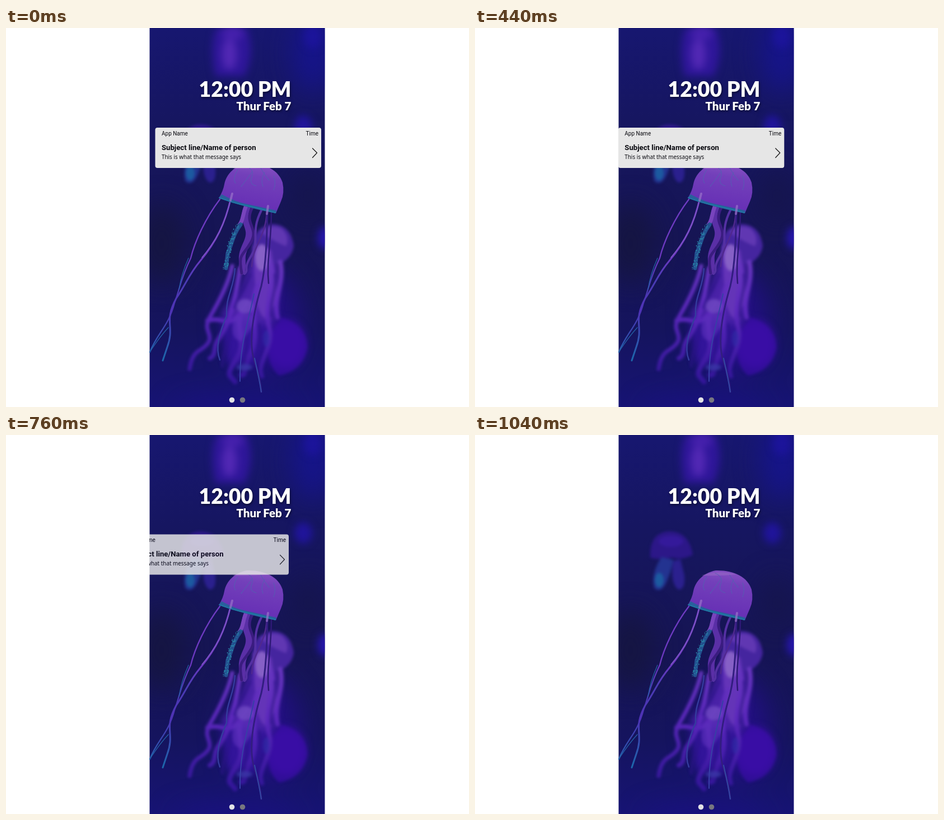
An HTML page for the animation above (2.84 s loop, 827 by 677 pixels).

```html
<!DOCTYPE html>
<html lang="en">
<head>
<meta charset="utf-8">
<title>Swipe to dismiss</title>
<style>
  html, body { margin: 0; width: 100%; height: 100%; overflow: hidden; background: #fff; }
  svg { display: block; }
  path { stroke-linecap: round; stroke-linejoin: round; }
  filter { color-interpolation-filters: sRGB; }
  .strands path { fill: none; }
  .clock { font-family: Lato, sans-serif; font-weight: 900; fill: #fff; text-anchor: end; filter: drop-shadow(1px 2px 2px #0008); }
  .small { font: 10px Roboto, sans-serif; }
  .subject { font: 700 13.15px Roboto, sans-serif; }
  .message { font: 9.87px "Noto Sans", sans-serif; }
</style>
</head>
<body>
<svg width="827" height="677" viewBox="0 0 827 677">
  <defs>
    <clipPath id="screen"><rect x="256.5" width="313" height="677"/></clipPath>
    <linearGradient id="water" x2="0" y2="1">
      <stop offset="0" stop-color="#171770"/>
      <stop offset=".25" stop-color="#161660"/>
      <stop offset=".55" stop-color="#161554"/>
      <stop offset=".8" stop-color="#15145e"/>
      <stop offset="1" stop-color="#171474"/>
    </linearGradient>
    <linearGradient id="bell" x1=".6" y1="0" x2=".4" y2="1">
      <stop offset="0" stop-color="#8550c2"/>
      <stop offset=".25" stop-color="#7340ba"/>
      <stop offset="1" stop-color="#642cb4"/>
    </linearGradient>
    <linearGradient id="tip" gradientUnits="userSpaceOnUse" x1="0" y1="310" x2="0" y2="590">
      <stop offset="0" stop-color="#6f3cc2"/>
      <stop offset=".35" stop-color="#6c38c0"/>
      <stop offset=".5" stop-color="#4a3cb4"/>
      <stop offset=".7" stop-color="#4e32b4"/>
      <stop offset="1" stop-color="#1d66aa"/>
    </linearGradient>
    <linearGradient id="veil" gradientUnits="userSpaceOnUse" x1="0" y1="380" x2="0" y2="630">
      <stop offset="0" stop-color="#6c3cc0"/>
      <stop offset=".5" stop-color="#5c28bc"/>
      <stop offset="1" stop-color="#34169a"/>
    </linearGradient>
    <filter id="soft" x="-60%" y="-60%" width="220%" height="220%"><feGaussianBlur stdDeviation="2.8"/></filter>
    <filter id="mist" x="-80%" y="-80%" width="260%" height="260%"><feGaussianBlur stdDeviation="7"/></filter>
    <filter id="haze" x="-80%" y="-80%" width="260%" height="260%"><feGaussianBlur stdDeviation="24"/></filter>
  </defs>

  <g clip-path="url(#screen)">
    <rect x="256" width="314" height="677" fill="url(#water)"/>

    <!-- depth and distant glows -->
    <g filter="url(#haze)">
      <ellipse cx="548" cy="45" rx="34" ry="70" fill="#16148c"/>
      <ellipse cx="278" cy="385" rx="42" ry="70" fill="#151542"/>
      <ellipse cx="540" cy="300" rx="28" ry="45" fill="#15154c"/>
      <ellipse cx="460" cy="525" rx="65" ry="95" fill="#220f82"/>
      <ellipse cx="410" cy="685" rx="110" ry="22" fill="#1a1080"/>
    </g>
    <g filter="url(#mist)">
      <path d="M376 0H430Q446 45 426 86H374Q362 35 376 0" fill="#2f169a"/>
      <ellipse cx="399" cy="47" rx="13" ry="28" fill="#5228b4"/>
      <ellipse cx="405" cy="8" rx="20" ry="13" fill="#4520ac"/>
      <ellipse cx="531" cy="175" rx="16" ry="19" fill="#20149a"/>
      <ellipse cx="548" cy="15" rx="16" ry="22" fill="#1c149a"/>
      <ellipse cx="570" cy="375" rx="13" ry="20" fill="#2616ac"/>
    </g>
    <g filter="url(#soft)">
      <path d="M313 219Q311 174 347 172Q382 172 389 214Q370 224 352 219Q331 224 313 219" fill="#2c1788"/>
      <ellipse cx="350" cy="190" rx="22" ry="10" fill="#34199a"/>
      <path d="M333 218Q314 247 320 273Q331 284 341 265Q351 243 354 223" fill="#233390"/>
      <path d="M354 225Q348 265 363 276Q376 277 374 251L367 222" fill="#2b208e"/>
      <ellipse cx="329" cy="259" rx="8" ry="13" fill="#1c5aa0"/>
    </g>

    <!-- rear jellyfish -->
    <g filter="url(#mist)">
      <ellipse cx="501" cy="565" rx="35" ry="43" fill="#3a0fa4"/>
      <path d="M444 390L487 395Q490 470 478 525L440 560L400 550L385 510L420 470Z" fill="#4a22a8"/>
      <path d="M385 515L470 530L450 600H395Z" fill="#32149a"/>
    </g>
    <g filter="url(#soft)">
      <path d="M492 517Q536 532 538 570Q530 612 488 621Q462 600 472 552" fill="#390ea6" opacity=".7"/>
      <path d="M440 398Q439 356 475 350Q509 351 514 389Q511 410 491 420Q460 425 440 398" fill="#45259f"/>
      <path d="M454 364Q472 349 492 358Q508 373 500 390Q470 377 454 364" fill="#6a3eb8" opacity=".75"/>
      <path d="M441 389Q459 384 474 398L482 452Q486 495 464 520Q444 505 445 458Z" fill="#6434b8"/>
      <ellipse cx="457" cy="410" rx="12" ry="24" fill="#8660c6"/>
      <g class="strands" stroke="url(#veil)">
        <path d="M404 425C398 455 380 490 362 520" stroke-width="7"/>
        <path d="M362 520C350 545 382 552 347 575C332 583 330 598 328 609" stroke-width="7"/>
        <path d="M418 430C411 470 405 518 382 552C367 570 378 583 364 590" stroke-width="8"/>
        <path d="M431 490C398 531 435 555 412 590S402 620 409 632" stroke-width="9"/>
        <path d="M452 455C429 499 456 545 437 581S432 618 420 620" stroke-width="9"/>
        <path d="M471 415C483 455 460 500 470 535S446 597 457 622" stroke-width="8"/>
        <path d="M490 418C498 458 476 479 485 517" stroke-width="8"/>
        <path d="M360 523C385 514 396 536 415 513" stroke-width="8"/>
      </g>
      <g class="strands" stroke="#2c1488" stroke-width="4" opacity=".75">
        <path d="M436 440C426 470 412 480 408 500M400 535C404 560 385 580 386 605M428 545C432 570 424 590 426 615M452 530C458 555 446 575 447 600M480 440C484 470 470 490 474 515"/>
      </g>
      <ellipse cx="427" cy="497" rx="15" ry="13" fill="#6c46c0" opacity=".85"/>
      <path d="M408 517Q440 501 445 526L421 560Q397 556 408 517" fill="#5c30bc" opacity=".65"/>
      <ellipse cx="426" cy="606" rx="14" ry="6" fill="#3c3caa" opacity=".7"/>
      <ellipse cx="465" cy="555" rx="6" ry="15" fill="#3030a8" opacity=".6"/>
    </g>

    <!-- front jellyfish -->
    <g class="strands">
      <path d="M431 319C418 349 444 354 430 384S425 410 421 435" stroke="#5a2fa6" stroke-width="12"/>
      <path d="M440 321C424 350 452 356 438 382S414 400 421 438" stroke="#3a1c80" stroke-width="5"/>
      <path d="M428 320C422 335 424 342 418 350" stroke="#7844bd" stroke-width="7"/>
      <path d="M456 326C436 365 454 381 438 407S435 430 426 439" stroke="#5430a2" stroke-width="4"/>
      <path d="M466 328C464 374 440 390 439 426" stroke="#50288f" stroke-width="2.5"/>
      <path d="M419 351C405 369 404 385 396 402L393 429" stroke="#22508f" stroke-width="7"/>
      <path d="M474 328C474 383 465 416 469 456" stroke="#2e1976" stroke-width="2.5"/>
      <path d="M467 326C466 370 465 422 456 461C440 515 432 565 445 599Q454 625 456 650" stroke="#321d80" stroke-width="3"/>
      <path d="M409 430C407 466 392 479 394 514C382 543 373 571 382 593" stroke="#343c9e" stroke-width="2.4"/>
      <path d="M443 475C433 525 417 567 418 631" stroke="#3740a6" stroke-width="2"/>
      <path d="M444 590Q452 625 456 650" stroke="#3348a4" stroke-width="2"/>
      <path d="M382 306C356 340 337 382 330 411C312 448 311 464 301 491C290 534 270 545 257 579" stroke="url(#tip)" stroke-width="2.3"/>
      <path d="M402 303C391 350 376 381 347 416C326 441 323 455 304 483C281 525 302 532 288 570L280 594" stroke="url(#tip)" stroke-width="3"/>
      <path d="M400 311C391 350 376 379 350 410" stroke="#8058c6" stroke-width="1.6"/>
      <path d="M326 411Q313 440 309 467M290 535Q275 551 258 577" stroke="#2464a8" stroke-width="1.2"/>
    </g>
    <g id="speckles" fill="#2a84a8"></g>
    <path d="M380 304Q388 291 390 279C394 260 409 246 430 242C461 241 487 253 494 276Q498 295 491 310L482 331Q433 320 380 304" fill="url(#bell)"/>
    <path d="M405 251Q430 240 467 249Q440 252 405 251" fill="#9a6cc8" opacity=".5"/>
    <path d="M380 304L385 297Q410 311 433 315L483 326L482 331Q428 321 380 304" fill="#2a5f9c"/>
    <g class="strands">
      <path d="M381 303Q407 313 428 317T481 330" stroke="#1b7fa4" stroke-width="1.6"/>
      <path d="M414 253Q404 270 410 277M429 247Q444 253 439 266T447 282M455 250Q462 263 470 272M440 256Q429 272 420 283M462 258Q454 271 459 283M478 264Q483 278 478 289" stroke="#5261b2" stroke-width="1.2" opacity=".75"/>
      <path d="M404 296L401 308M468 318L466 332" stroke="#9a72ca" stroke-width="4" opacity=".7"/>
    </g>

    <g class="clock">
      <text x="509.5" y="123" font-size="37.4">12:00 PM</text>
      <text x="509.5" y="147" font-size="20.5">Thur Feb 7</text>
    </g>

    <g id="card">
      <rect x="266.5" y="178" width="296.5" height="72" rx="4" fill="#e6e6e6"/>
      <g fill="#09090f">
        <text class="small" x="278" y="192">App Name</text>
        <text class="small" x="558" y="192" text-anchor="end">Time</text>
        <text class="subject" x="278" y="218">Subject line/Name of person</text>
        <text class="message" x="278" y="234">This is what that message says</text>
      </g>
      <path d="M547.5 215L555.5 223L547.5 231.5" fill="none" stroke="#111" stroke-width="1.2"/>
    </g>

    <circle cx="403.5" cy="664.5" r="4.8" fill="#e2e2e5"/>
    <circle cx="422.5" cy="664.5" r="4.8" fill="#77777f"/>
  </g>
</svg>
<script>
  const LOOP = 2840, STEP = 40, FADE_START = 560;
  // Leftward travel of the card at each step
  const travel = [0, .05, .1, .3, .6, 1.2, 2, 3, 4.4, 6.1, 8.2, 10.7, 13.8, 17.4, 21.8,
    27, 33, 40, 48.5, 58, 73, 92, 115, 142, 178, 227, 320];
  const card = document.getElementById('card');

  let seed = 7;
  const random = () => (seed = seed * 16807 % 2147483647) / 2147483647;
  const speckles = document.getElementById('speckles');
  for (let i = 0; i < 110; i++) {
    const u = random();
    const dot = document.createElementNS('http://www.w3.org/2000/svg', 'circle');
    dot.setAttribute('cx', 419 - 27 * Math.sqrt(u) + (random() - .5) * 9);
    dot.setAttribute('cy', 349 + 82 * u);
    dot.setAttribute('r', .4 + random() * .7);
    speckles.append(dot);
  }

  const start = performance.now();
  function play() {
    const time = (performance.now() - start) % LOOP;
    const step = Math.min(Math.floor(time / STEP), travel.length - 1);
    const late = Math.max(0, step * STEP - FADE_START);
    card.setAttribute('transform', `translate(${-travel[step]} ${-late / 320})`);
    card.setAttribute('opacity', 1 - late * .0008);
    requestAnimationFrame(play);
  }
  play();
</script>
</body>
</html>
```
